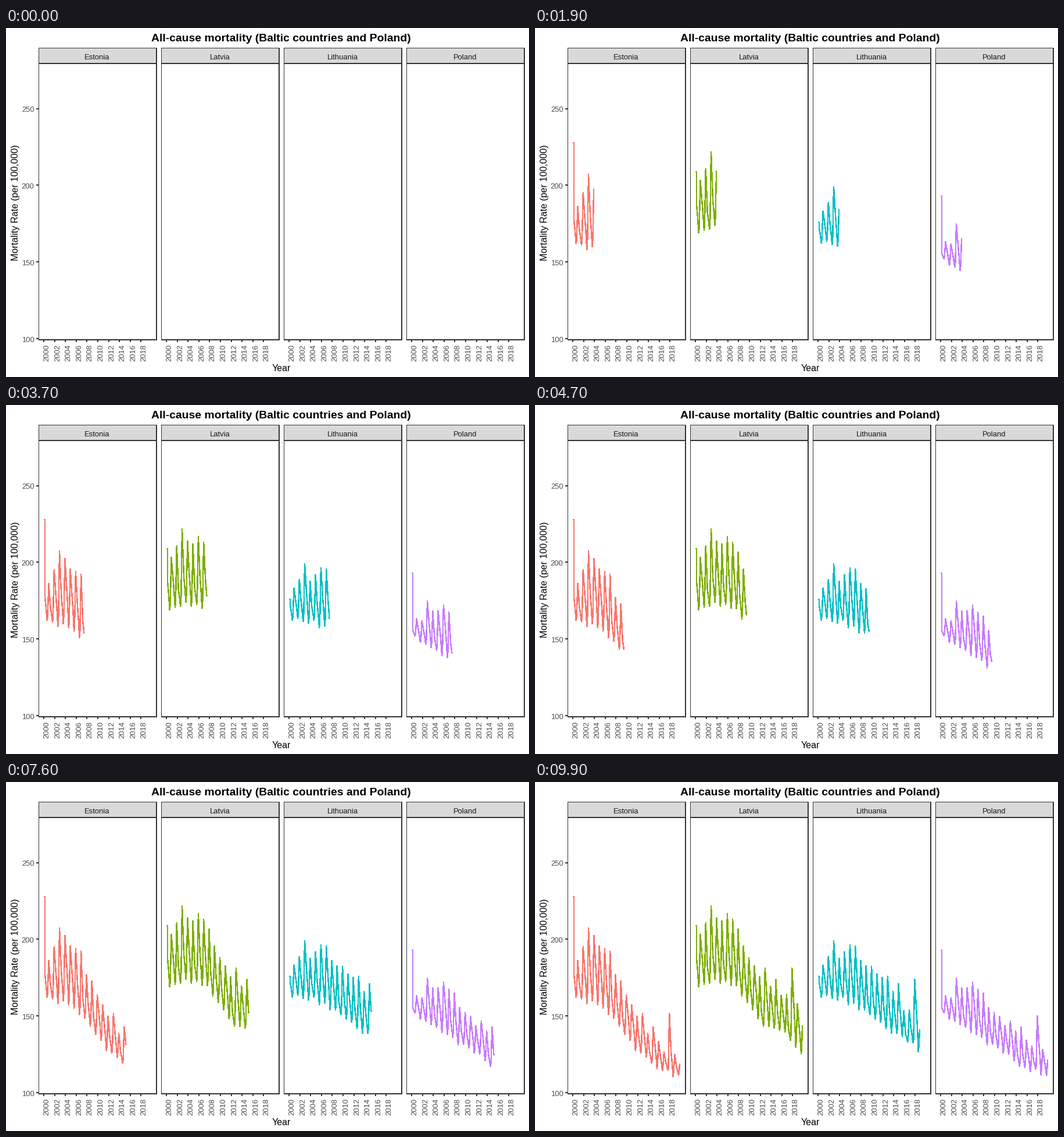
Write a matplotlib script that moves like this. It is 900x600 px and loops after 10000 ms.

```python
import matplotlib.pyplot as plt
import numpy as np
from matplotlib.animation import FuncAnimation
from matplotlib.patches import Rectangle

W, H, DPI = 900, 600, 100
FRAMES, INTERVAL = 100, 100
PANEL_STEP = 211
START, END = 0.15, 19.91      # first and last date, in years since 2000
DARK, GREY = "#333333", "#4D4D4D"

KEY_YEARS = np.arange(0, 21, 4)
HARD_WINTERS = {3: 9, 6: 6, 7: 6, 13: 8, 15: 9, 18: 22}  # extra deaths

# name, colour, first rate, last year, winter and summer rates at the key years
COUNTRIES = [
    ("Estonia", "#F8766D", 228, END,
     (184, 203, 177, 150, 131, 124), (163, 158, 147, 127, 116, 109)),
    ("Latvia", "#7CAE00", 209, END,
     (203, 214, 206, 175, 164, 157), (169, 174, 169, 146, 141, 124)),
    ("Lithuania", "#00BFC4", 176, 18.95,
     (184, 190, 187, 173, 156, 143), (162, 162, 154, 144, 134, 126)),
    ("Poland", "#C77CFF", 193, END,
     (161, 167, 163, 142, 133, 129), (153, 143, 134, 125, 115, 112)),
]


def px(year):
    return 64.2 + 9.28 * year


def py(rate):
    return 534 - (rate - 100) * 2.633


def seasonal_curve(first, last, winter, summer, rng):
    """A peak each winter, a quick drop in spring and a trough in late summer."""
    pts = [(START, first), (START + 0.15, first)]
    for year in range(21):
        high = np.interp(year, KEY_YEARS, winter) + HARD_WINTERS.get(year, 0) + rng.uniform(-3, 3)
        low = np.interp(year + 0.7, KEY_YEARS, summer) + rng.uniform(-2, 2)
        spring = rng.uniform(0.25, 0.6)
        if year:
            pts.append((year, high))
        for part, level in ((0.32, spring), (0.5, spring * 0.6), (0.7, 0), (0.8, 0.1)):
            pts.append((year + part, low + (high - low) * level))
    t, rate = np.array(pts).T
    keep = t < last
    return np.append(t[keep], last), np.append(rate[keep], np.interp(last, t, rate))


plt.rcParams["font.family"] = "Liberation Sans"
fig = plt.figure(figsize=(W / DPI, H / DPI), dpi=DPI, facecolor="white")
ax = fig.add_axes([0, 0, 1, 1])
ax.set(xlim=(0, W), ylim=(H, 0))
ax.axis("off")


def box(x0, y0, x1, y1, color=DARK):
    ax.add_patch(Rectangle((x0, y0), x1 - x0, y1 - y0, fc=color, lw=0,
                           antialiased=False, zorder=1))


def label(x, y, text, px_size, color="black", ha="center", **kw):
    ax.text(x, y, text, size=px_size * 72 / DPI, color=color, ha=ha,
            va="baseline", rotation_mode="anchor", **kw)


def draw_panel(dx, name):
    left, right = 56 + dx, 260 + dx
    box(left, 34, right, 61, "#D9D9D9")
    box(left, 34, left + 1, 537)
    box(right - 2, 34, right, 537)
    box(left, 34, right, 35)
    box(left, 60, right, 62)
    box(left, 535, right, 537)
    label(157 + dx, 54, name, 13, "#1A1A1A")
    for year in range(0, 20, 2):
        x = round(px(year)) + dx
        box(x, 537, x + 2, 540)
        label(x + 9.5, 544, str(2000 + year), 13, GREY, "right", rotation=90)


label(473.5, 23, "All-cause mortality (Baltic countries and Poland)", 19.35, weight="bold")
label(474, 590, "Year", 16)
label(21, 300, "Mortality Rate (per 100,000)", 16, rotation=90)
for rate in range(100, 251, 50):
    y = int(py(rate) - 0.9)
    box(52, y, 56, y + 2)
    label(48.5, y + 6.5, str(rate), 13, GREY, "right")

curves = []
rng = np.random.default_rng(4)
for i, (name, color, first, last, winter, summer) in enumerate(COUNTRIES):
    dx = i * PANEL_STEP
    draw_panel(dx, name)
    line, = ax.plot([], [], color=color, lw=1.42 * 72 / DPI, antialiased=False,
                    solid_capstyle="butt", solid_joinstyle="round", zorder=2)
    curves.append((line, dx, *seasonal_curve(first, last, winter, summer, rng)))


def update(frame):
    now = START + 0.04 + (END - START - 0.04) * frame / (FRAMES - 1)
    for line, dx, t, rate in curves:
        edge = min(now, t[-1])
        shown = t < edge
        x = np.append(t[shown], edge)
        y = np.append(rate[shown], np.interp(edge, t, rate))
        line.set_data(px(x) + dx, py(y))
        line.set_visible(frame > 0)
    return [c[0] for c in curves]


anim = FuncAnimation(fig, update, frames=FRAMES, interval=INTERVAL,
                     repeat=True, repeat_delay=0)
plt.show()
```
